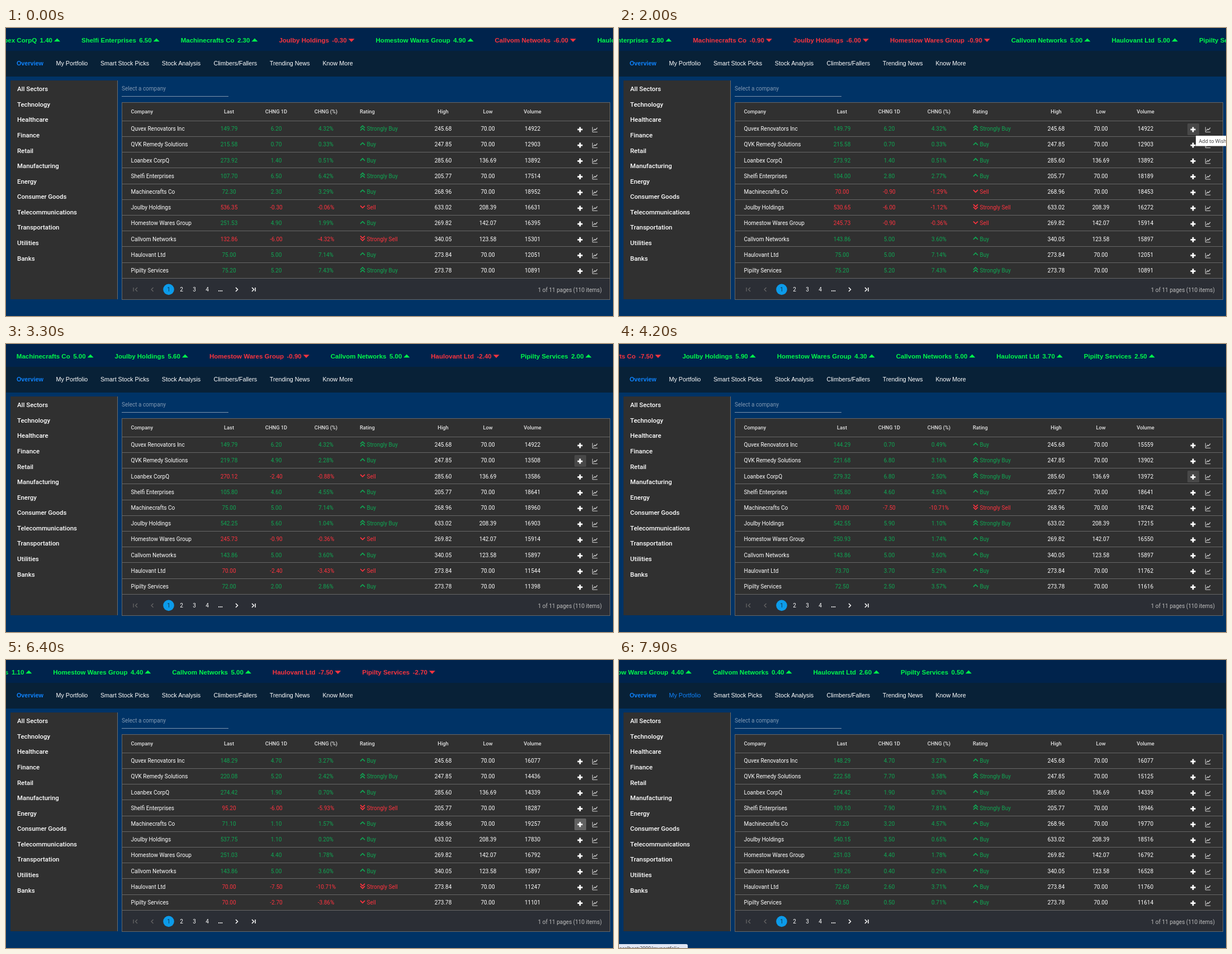
An HTML page that plays this animation: 1086 px wide and 516 px high, repeating every 8 s.

```html
<!DOCTYPE html>
<html lang="en">
<head>
<meta charset="utf-8">
<title>Stock overview</title>
<style>
  html, body { margin: 0; width: 100%; height: 100%; overflow: hidden; background: #003366; }
  svg { display: block; width: 1086px; height: 516px; font: 10px Roboto, sans-serif; fill: #fff; }
  .ticker { font: bold 11.5px "Liberation Sans", Arial, sans-serif; }
  .nav { font: 10.75px "Liberation Sans", Arial, sans-serif; }
  .nav .active { font-weight: bold; }
  .nav .active, .nav .hover { fill: #0f84ff; }
  .side { font-size: 11.4px; font-weight: 500; }
  .head { font-size: 9.3px; font-weight: 500; fill: #e2e2e2; }
  .mid { text-anchor: middle; }
  .end { text-anchor: end; }
  .line { fill: none; stroke: #fff; }
  .up { fill: #0fa653; }
  .down { fill: #ff333f; }
  .up .line { stroke: #0fa653; }
  .down .line { stroke: #ff333f; }
  .selected .up { fill: #4f7a5e; }
  .selected .up .line { stroke: #4f7a5e; }
  .ticker .up { fill: #00f94b; }
  .ticker .down { fill: #f8343f; }
  .small { font: 8.8px "Open Sans", sans-serif; fill: #333; }
</style>
</head>
<body>
<svg viewBox="0 0 1086 516">
  <rect width="1086" height="41" fill="#00234c"/>
  <rect y="41" width="1086" height="46" fill="#082137"/>
  <g id="ticker" class="ticker"></g>
  <g id="nav" class="nav"></g>
  <rect x="8" y="94" width="192" height="392" fill="#303030"/>
  <path d="M199.5 94V486" class="line" style="stroke:#6c6c6c"/>
  <g id="side" class="side"></g>
  <text x="207" y="111.6" fill="#8299b2">Select a company</text>
  <path d="M207 122.5H398" class="line" style="stroke:#7f95ad"/>
  <rect x="207.5" y="134" width="873" height="352" fill="#303030"/>
  <rect x="208" y="448" width="872" height="38" fill="#2b2e35"/>
  <g id="head" class="head"></g>
  <g id="rows"></g>
  <g id="pager"></g>
  <rect x="207.5" y="133.5" width="873" height="353" class="line" style="stroke:#676767"/>
  <g id="tooltip" class="small">
    <rect x="1032" y="193" width="80" height="18.5" fill="#fff"/>
    <text x="1037.5" y="205.5">Add to Wishlist</text>
  </g>
  <g id="status" class="small">
    <rect x="-5" y="509" width="128" height="12" rx="3" fill="#dfe6f5"/>
    <text x="-2" y="520">localhost:3000/myportfolio</text>
  </g>
</svg>
<script>
const LOOP = 8000, STEP = 100, UPDATE = 1400;
const ROW_TOP = 166.3, ROW_H = 28.2, RULE = '#676767';
const FLOOR_PRICE = 70;

const $ = id => document.getElementById(id);
const text = (x, y, s, cls = '') => `<text x="${x}" y="${y}" class="${cls}">${s}</text>`;
const line = (d, width = 1, color = '') =>
  `<path d="${d}" class="line" stroke-width="${width}" ${color && `style="stroke:${color}"`}/>`;
const random = (a, b) => {
  const v = Math.sin(a * 12.9898 + b * 78.233) * 43758.5453;
  return v - Math.floor(v);
};

const pen = document.createElement('canvas').getContext('2d');
function textWidth(s, font) {
  pen.font = font + ' "Liberation Sans", Arial, sans-serif';
  return pen.measureText(s).width;
}

// Day changes in order of update; null keeps the previous one.
const company = (name, close, high, volume, changes, low = FLOOR_PRICE) =>
  ({ name, close, high, volume, changes, low });
const companies = [
  company('Quvex Renovators Inc', 143.59, 245.68, 14922, [6.2, null, null, .7, 4.7, null]),
  company('QVK Remedy Solutions', 214.88, 247.85, 12903, [.7, null, 4.9, 6.8, 5.2, 7.7]),
  company('Loanbex CorpQ', 272.52, 285.6, 13892, [1.4, null, -2.4, 6.8, 1.9, null], 136.69),
  company('Shelfi Enterprises', 101.2, 205.77, 17514, [6.5, 2.8, 4.6, null, -6, 7.9]),
  company('Machinecrafts Co', 70, 268.96, 18952, [2.3, -.9, 5, -7.5, 1.1, 3.2]),
  company('Joulby Holdings', 536.65, 633.02, 16631, [-.3, -6, 5.6, 5.9, 1.1, 3.5], 208.39),
  company('Homestow Wares Group', 246.63, 269.82, 16395, [4.9, -.9, null, 4.3, 4.4, null], 142.07),
  company('Callvom Networks', 138.86, 340.05, 15301, [-6, 5, null, null, null, .4], 123.58),
  company('Haulovant Ltd', 70, 273.84, 12051, [5, null, -2.4, 3.7, -7.5, 2.6]),
  company('Pipilty Services', 70, 273.78, 10891, [5.2, null, 2, 2.5, -2.7, .5])
];

// Trading volume walks in the direction of each new change.
function quote(c, update) {
  let change = c.changes[0], volume = c.volume;
  for (let u = 1; u <= update; u++) {
    if (c.changes[u] === null) continue;
    change = c.changes[u];
    volume += Math.sign(change) * Math.round(200 + 500 * random(c.close, u));
  }
  return {
    change, volume, high: c.high, low: c.low,
    last: Math.max(FLOOR_PRICE, c.close + change),
    percent: change / c.close * 100
  };
}

const money = n => n.toFixed(2);
const direction = change => change < 0 ? 'down' : 'up';
const priceColumns = [
  [399, 'Last', q => money(q.last)],
  [483.5, 'CHNG 1D', q => money(q.change)],
  [572.5, 'CHNG (%)', q => money(q.percent) + '%']
];
const marketColumns = [
  [782, 'High', q => money(q.high)],
  [862, 'Low', q => money(q.low)],
  [942, 'Volume', q => q.volume]
];

// Left edge of the fourth ticker item.
function scrollAt(t) {
  const turn = 6400;
  return t < turn ? 135 - .0902 * t : 135 - .0902 * turn - .0837 * (t - turn);
}

function tickerMarkup(t) {
  const font = 'bold 11.5px', update = Math.floor((t + STEP) / UPDATE);
  const items = companies.map(c => {
    const { change } = quote(c, update);
    const nameWidth = textWidth(c.name, font) + 5.5;
    const width = nameWidth + textWidth(money(change), font) + 14;
    return { name: c.name, change, nameWidth, width };
  });
  // The strip hangs on its left end, so wider values push later items along.
  const lead = companies.slice(0, 3).reduce((sum, c) =>
    sum + textWidth(c.name, font) + 5.5 + textWidth('0.00', font) + 14 + 38, 0);
  let x = scrollAt(t) - lead;
  return items.map(({ name, change, nameWidth, width }) => {
    const left = x, right = x + width;
    x = right + 38;
    if (right < 0 || left > 1086) return '';
    const caret = change < 0 ? 'M0 19.3h-11l5.5 5.7z' : 'M0 24.3h-11l5.5-5.7z';
    return `<g class="${direction(change)}">` + text(left, 26.2, name) +
      text(left + nameWidth, 26.2, money(change)) +
      `<path transform="translate(${right})" d="${caret}"/></g>`;
  }).join('');
}

function ratingMarkup(change, y) {
  const strong = Math.abs(change) > 5;
  const sign = change < 0 ? -1 : 1;
  const chevron = cy => line(`M634 ${cy + 2 * sign}l4 ${-4 * sign} 4 ${4 * sign}`, 1.7);
  const marks = strong ? chevron(y - 3.2) + chevron(y + 1.2) : chevron(y - 1);
  return marks + text(645.5, y + 3.7, (strong ? 'Strongly ' : '') + (change < 0 ? 'Sell' : 'Buy'));
}

function rowMarkup(c, i, update, selected, hover) {
  const q = quote(c, update);
  const top = ROW_TOP + i * ROW_H, y = top + ROW_H / 2, icon = y + 1.5;
  const cells = columns => columns.map(([x, , value]) => text(x, y + 3.7, value(q), 'mid')).join('');
  const button = `<rect x="1017" y="${Math.floor(icon - 10.6)}" width="21" height="21" rx="1.5"
    fill="${i > 2 ? '#626262' : '#484848'}"/>`;
  return `<g class="${selected ? 'selected' : ''}">` +
    `<rect x="208" y="${Math.floor(top)}" width="872" height="29" fill="${selected ? '#7f6f6e' : '#303030'}"/>` +
    line(`M208 ${Math.floor(top) + .5}H1080`, 1, RULE) +
    text(223.5, y + 3.7, c.name) +
    `<g class="${direction(q.change)}">${cells(priceColumns)}${ratingMarkup(q.change, y)}</g>` +
    cells(marketColumns) +
    (hover ? button : '') +
    line(`M1022.5 ${icon}h9M1027 ${icon - 4.5}v9`, 2.8) +
    line(`M1049.3 ${icon - 4.5}v9h9`, 1, '#d0d0d0') +
    line(`M1050.8 ${icon + 2}l2.4 -2.7 1.6 1.2 3.2 -3.8`, 1.3, '#d0d0d0') + '</g>';
}

function navMarkup(hover) {
  let x = 19;
  return ['Overview', 'My Portfolio', 'Smart Stock Picks', 'Stock Analysis',
    'Climbers/Fallers', 'Trending News', 'Know More'].map((s, i) => {
    const left = x;
    x += textWidth(s, (i ? '' : 'bold ') + '10.75px') + 22.7;
    return text(left, 67.4, s, i === 0 ? 'active' : i === 1 && hover ? 'hover' : '');
  }).join('');
}

$('side').innerHTML = ['All Sectors', 'Technology', 'Healthcare', 'Finance', 'Retail', 'Manufacturing', 'Energy',
  'Consumer Goods', 'Telecommunications', 'Transportation', 'Utilities', 'Banks']
  .map((s, i) => text(20, 113.3 + i * 27.57, s)).join('');

$('head').innerHTML = text(223.5, 153.3, 'Company') + text(633, 153.3, 'Rating') +
  [...priceColumns, ...marketColumns].map(([x, s]) => text(x, 153.3, s, 'mid')).join('');

$('pager').innerHTML = line('M208 448.5H1080', 1, RULE) +
  line('M228 465v7M235 465l-3.5 3.5 3.5 3.5M263.5 465l-3.5 3.5 3.5 3.5', 1.3, '#666') +
  '<circle cx="291" cy="468.4" r="9.8" fill="#0c9bea"/>' +
  [1, 2, 3, 4].map(n => `<g fill="${n === 1 ? '#12344a' : '#fff'}">${text(268 + n * 23, 472, n, 'mid')}</g>`).join('') +
  [-1, 0, 1].map(n => `<circle cx="${383.6 + n * 2.8}" cy="471" r="1"/>`).join('') +
  line('M411 465l3.5 3.5-3.5 3.5M440 465l3.5 3.5-3.5 3.5M446 465v7', 1.5) +
  `<g fill="#bdbdbd">${text(1066, 473, '1 of 11 pages (110 items)', 'end')}</g>`;

// The pointer walks down the add buttons; a click marks its row until the next update.
const hoveredRow = t => t < 6800 ? Math.floor((t - 1500) / 1200) : -1;
const clicks = [{ row: 1, at: 3700 }, { row: 2, at: 4700 }, { row: 4, at: 6600 }];
const updateAt = t => Math.floor(t / UPDATE);
function selectedRow(t) {
  const click = clicks.findLast(({ at }) => at <= t);
  return click && updateAt(click.at) === updateAt(t) ? click.row : -1;
}

let shownTime = -1, shownTable = '';

function draw() {
  const t = Math.floor(performance.now() % LOOP / STEP) * STEP;
  if (t !== shownTime) {
    shownTime = t;
    const update = updateAt(t), hover = hoveredRow(t), selected = selectedRow(t);
    const table = [update, hover, selected].join();
    if (table !== shownTable) {
      shownTable = table;
      $('rows').innerHTML = companies
        .map((c, i) => rowMarkup(c, i, update, i === selected, i === hover)).join('');
    }
    $('ticker').innerHTML = tickerMarkup(t);
    $('nav').innerHTML = navMarkup(t >= 7600);
    $('tooltip').style.display = t >= 1900 && t < 2600 ? '' : 'none';
    $('status').style.display = t >= 7700 ? '' : 'none';
  }
  requestAnimationFrame(draw);
}
draw();
</script>
</body>
</html>
```
